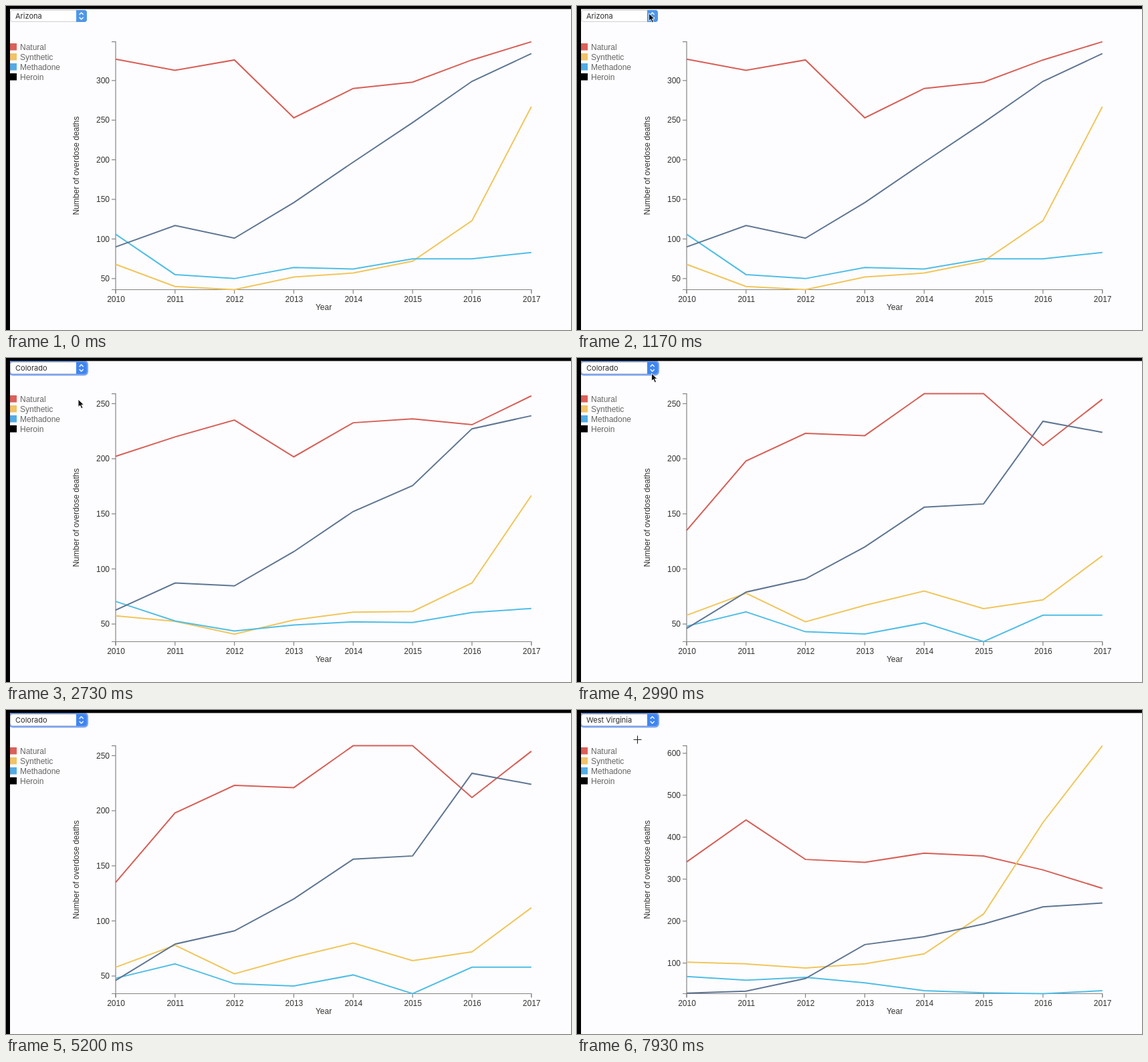
An HTML page that plays this animation: 845x486 px, repeating every 8 s.

```html
<!DOCTYPE html>
<html lang="en">
<head>
<meta charset="utf-8">
<title>Overdose deaths by state</title>
<style>
  html, body { margin: 0; width: 100%; height: 100%; overflow: hidden; background: #fdfcfe; }
  svg { display: block; width: 845px; height: 486px; }
  text { font: 12px "Liberation Sans", Arial, sans-serif; fill: #333; }
  .legend text { fill: #666; }
  .axis { fill: none; stroke: #858585; stroke-width: 1.2; }
  .line { fill: none; stroke-width: 2; }
  #state { font: 11px Inter, sans-serif; fill: #2c2c2c; }
  .end { text-anchor: end; }
  .mid { text-anchor: middle; }
</style>
</head>
<body>
<svg viewBox="0 0 845 486">
  <g id="axes"></g>
  <g id="yTicks"></g>
  <g id="lines"></g>
  <g id="legend" class="legend"></g>
  <text class="mid" x="475" y="456">Year</text>
  <text class="mid" transform="translate(109 239.5) rotate(-90)">Number of overdose deaths</text>

  <rect id="ring" x="5.5" y="5" width="116" height="20" rx="4.5" fill="none" stroke="#7ba4ef" stroke-width="3"/>
  <rect id="box" x="6.5" y="6.5" width="114" height="17" rx="3.5" fill="#fff" stroke="#d0d0d4"/>
  <path id="button" d="M105 6h12q4 0 4 4v10q0 4-4 4h-12z"/>
  <path d="M109.7 13l3-3 3 3M109.7 17l3 3 3-3" fill="none" stroke="#fff" stroke-width="1.4"/>
  <text id="state" x="14" y="19"></text>

  <path id="arrow" d="M0 0v11.5l2.7-2.4 2.1 4.7 2.2-1-2.1-4.5h3.6z" fill="#111" stroke="#fff" stroke-width=".9"/>
  <path id="cross" d="M-6 0H6M0-6V6" stroke="#222" stroke-width="1.1"/>
  <path d="M0 0h845v4.5H6V486H0z" fill="#000"/>
</svg>
<script>
const LOOP = 8000, EASE_MS = 250;
const LEFT = 164, RIGHT = 785.7, TOP = 53.6, BOTTOM = 425.5;

const series = [
  { name: "Natural", line: "#d65f57", swatch: "#dc5f5a" },
  { name: "Synthetic", line: "#f0c65b", swatch: "#f0c368" },
  { name: "Methadone", line: "#4fbee6", swatch: "#52ace4" },
  { name: "Heroin", line: "#5d7592", swatch: "#000" }
];

const states = [
  { name: "Arizona", start: 0, min: 36, max: 349, tick: 50, data: [
    [327, 313, 326, 253, 290, 298, 326, 349],
    [68, 40, 36, 52, 57, 72, 123, 267],
    [106, 55, 50, 64, 62, 75, 75, 83],
    [90, 117, 101, 146, 197, 247, 299, 334]] },
  { name: "Colorado", start: 2616, min: 34, max: 259, tick: 50, data: [
    [135, 198, 223, 221, 259, 259, 212, 254],
    [58, 78, 52, 67, 80, 64, 72, 112],
    [48, 61, 43, 41, 51, 34, 58, 58],
    [46, 79, 91, 120, 156, 159, 234, 224]] },
  { name: "West Virginia", start: 7296, min: 27, max: 618, tick: 100, data: [
    [341, 441, 347, 340, 362, 355, 322, 278],
    [102, 98, 88, 98, 122, 217, 435, 618],
    [68, 59, 66, 53, 34, 29, 27, 34],
    [28, 33, 63, 144, 163, 193, 234, 243]] }
];

// Picture changes: time, pointer kind, pointer x, y
const steps = [
  [0], [260, "arrow", 94, 58], [390, "arrow", 102, 34], [520, "arrow", 106, 19],
  [650, "arrow", 108, 12], [910, "arrow", 107.5, 9], [1040, "arrow", 107.5, 10],
  [1170, "arrow", 107.5, 11], [2730, "arrow", 108, 62], [2860, "arrow", 110, 40],
  [2990, "arrow", 111.5, 23], [3120, "arrow", 110, 17], [3250, "arrow", 109, 13],
  [3380, "arrow", 108, 12], [5200], [7410], [7540],
  [7800, "cross", 98, 34], [7930, "cross", 90.5, 44.5]
];
const FOCUS_AT = 2470;

const $ = id => document.getElementById(id);
const add = (parent, tag, attrs, text = "") => {
  const el = document.createElementNS("http://www.w3.org/2000/svg", tag);
  for (const key in attrs) el.setAttribute(key, attrs[key]);
  el.textContent = text;
  return parent.appendChild(el);
};
const xAt = i => LEFT + (RIGHT - LEFT) * i / 7;
const yAt = (state, v) => BOTTOM - (BOTTOM - TOP) * (v - state.min) / (state.max - state.min);
const cubic = t => t < .5 ? 4 * t ** 3 : 1 - 4 * (1 - t) ** 3;

add($("axes"), "path", { class: "axis", d: `M158 ${TOP}H${LEFT}V${BOTTOM}H158M${LEFT} 431V${BOTTOM}H${RIGHT}V431` });
for (let i = 0; i < 8; i++) {
  add($("axes"), "path", { class: "axis", d: `M${xAt(i)} ${BOTTOM}v6` });
  add($("axes"), "text", { class: "mid", x: xAt(i) + .5, y: 444 }, 2010 + i);
}

series.forEach((s, i) => {
  const y = 56 + 15 * i;
  add($("legend"), "rect", { x: 6, y, width: 10, height: 10.5, fill: s.swatch });
  add($("legend"), "text", { x: 21, y: y + 10 }, s.name);
  s.path = add($("lines"), "path", { class: "line", stroke: s.line });
});

for (const state of states) {
  state.axis = add($("yTicks"), "g", {});
  for (let v = state.tick; v <= state.max; v += state.tick) {
    const y = yAt(state, v);
    add(state.axis, "path", { class: "axis", d: `M158 ${y}h6` });
    add(state.axis, "text", { class: "end", x: 155, y: y + 4.2 }, v);
  }
}

function draw(time) {
  const step = steps.findLast(s => s[0] <= time);
  const [at, kind, x, y] = step;
  const index = states.findLastIndex(s => s.start <= at);
  const now = states[index], before = states[Math.max(0, index - 1)];
  const p = cubic(Math.min(1, (at - now.start) / EASE_MS));

  series.forEach((s, k) => {
    const points = now.data[k].map((v, i) => {
      const from = yAt(before, before.data[k][i]);
      return `${xAt(i)} ${from + (yAt(now, v) - from) * p}`;
    });
    s.path.setAttribute("d", "M" + points.join("L"));
  });
  for (const s of states) s.axis.style.display = s === now ? "" : "none";

  const focused = time >= FOCUS_AT;
  $("state").textContent = now.name;
  $("ring").style.display = focused ? "" : "none";
  $("button").setAttribute("fill", focused ? "#3f86f2" : "#4f97e6");
  for (const id of ["arrow", "cross"]) {
    $(id).style.display = id === kind ? "" : "none";
    if (id === kind) $(id).setAttribute("transform", `translate(${x} ${y})`);
  }
}

const begin = performance.now();
function tick() {
  draw((performance.now() - begin) % LOOP);
  requestAnimationFrame(tick);
}
tick();
</script>
</body>
</html>
```
